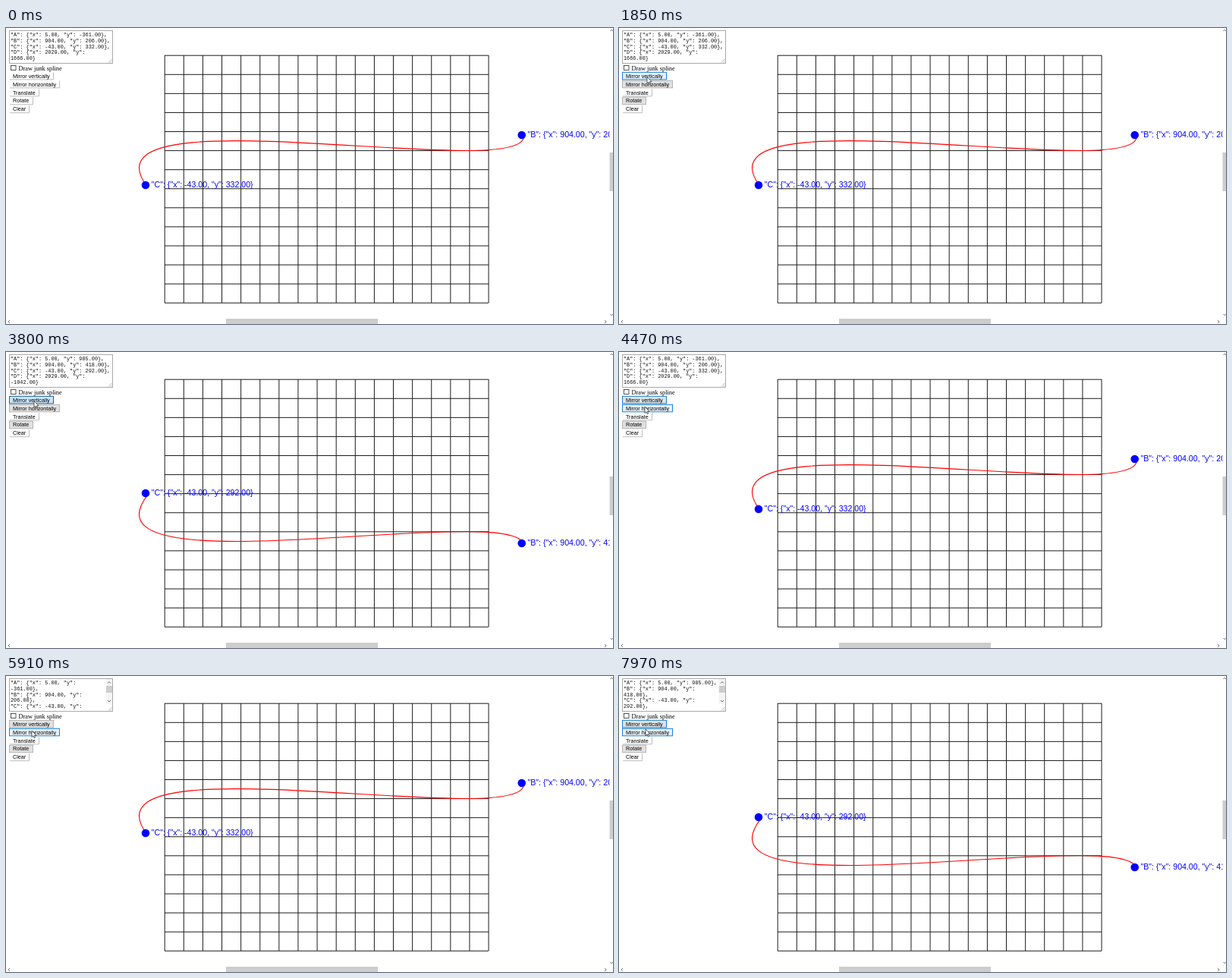
Recreate the animation shown at these times as an HTML page. Size 800x390 px, loop 8 s.

```html
<!DOCTYPE html>
<html lang="en">
<head>
<meta charset="utf-8">
<title>Spline editor</title>
<style>
  html, body { margin: 0; width: 100%; height: 100%; overflow: hidden; background: #fff; }
  svg { display: block; width: 800px; height: 390px; }
  text { white-space: pre; }
  .label { font: 10.6px "Liberation Sans", Arial, sans-serif; fill: #00f; }
  .btn text { font: 7.2px "Liberation Sans", Arial, sans-serif; fill: #000; }
  .area { font: 6.85px "Liberation Mono", "Courier New", monospace; fill: #111; }
  .check { font: 8.3px "Liberation Serif", "Times New Roman", serif; }
  .arrow { fill: none; stroke: #555; stroke-width: .9; }
  .thumb { fill: #cdcdcd; }
</style>
</head>
<body>
<svg viewBox="0 0 800 390">
  <path id="grid" fill="none" stroke="#1c1c1c" stroke-width="1"/>
  <path id="curve" fill="none" stroke="#f00" stroke-width="1.1"/>
  <g id="points"></g>

  <rect x="795.5" width="5" height="390" fill="#fff"/>
  <rect class="thumb" x="795.5" y="164" width="4.5" height="51"/>
  <rect class="thumb" x="290" y="383" width="200" height="7"/>
  <path class="arrow" d="M796.5 4l1.7-1.7 1.7 1.7M796.5 377l1.7 1.7 1.7-1.7M5 385l-1.9 1.9 1.9 1.9M789.2 385l1.9 1.9-1.9 1.9"/>

  <rect x="4.5" y="3.5" width="136" height="43" fill="#fff" stroke="#a9a9a9"/>
  <g id="area" class="area"></g>
  <g id="bar">
    <rect x="131.5" y="4" width="8.5" height="33" fill="#f4f4f4"/>
    <rect class="thumb" x="132" y="13" width="8" height="9"/>
    <path class="arrow" d="M134 9.6l2-2 2 2M134 32l2 2 2-2"/>
  </g>
  <path d="M135 45.5l4.5-4.5M137.6 45.5l1.9-1.9" stroke="#999" stroke-width=".7"/>

  <rect x="6.5" y="49.5" width="6.5" height="6" fill="#fff" stroke="#444" stroke-width=".9"/>
  <text class="check" x="16.5" y="55.6">Draw junk spline</text>
  <g id="buttons"></g>
  <path id="cursor" d="M0 0V8.5L2 6.8 3.3 9.8 4.6 9.2 3.3 6.3H6Z" fill="#fff" stroke="#000" stroke-width=".6"/>
</svg>
<script>
const LOOP = 8000, SCALE = 0.5235, OX = 206.5, OY = 33.2, SHIFT = 2.5;
const $ = id => document.getElementById(id);

function add(parent, tag, attrs) {
  const el = document.createElementNS('http://www.w3.org/2000/svg', tag);
  for (const k in attrs) el.setAttribute(k, attrs[k]);
  return parent.appendChild(el);
}
function set(el, attrs) {
  for (const k in attrs) el.setAttribute(k, attrs[k]);
}

const base = { A: [5, -361], B: [904, 206], C: [-43, 332], D: [2029, 1666] };

// Pointer positions: time, x, y
const moves = [
  [190, 279, 372], [300, 170, 265], [420, 80, 160], [530, 27, 97],
  [640, 30, 86], [760, 34, 73], [870, 37, 64.5],
  [4250, 37, 67], [4360, 36, 70], [4470, 34, 72],
  [4900, 35, 69.5], [5010, 35.5, 65.5], [5130, 36, 65],
  [5450, 36, 67], [5560, 35, 71], [5680, 34, 72],
  [7310, 35, 69], [7420, 36, 65],
  [7750, 36, 67], [7860, 36, 69.5], [7970, 35, 70]
];
// Clicks: press time, release time, button index
const clicks = [
  [1190, 1300, 0], [1730, 1850, 0], [2180, 2280, 0], [2710, 2830, 0],
  [3260, 3370, 0], [3800, 3900, 0], [4570, 4680, 1], [5800, 5910, 1],
  [6120, 6230, 1], [6450, 6550, 1], [7530, 7640, 0]
];

const buttons = [
  ['Mirror vertically', 58], ['Mirror horizontally', 66], ['Translate', 39],
  ['Rotate', 31], ['Clear', 26]
].map(([name, w], i) => {
  const y = 58 + i * 10.95, g = add($('buttons'), 'g', { class: 'btn' });
  const box = add(g, 'rect', { x: 4.5, y: y + .3, width: w, height: 9.6, 'stroke-width': .9 });
  const edge = add(g, 'path', {
    d: `M5 ${y + 9.9}H${w + 4.5}V${y + .5}`, fill: 'none', stroke: '#adadad', 'stroke-width': .8
  });
  add(g, 'text', { x: 9, y: y + 7.6 }).textContent = name;
  return { w, y, box, edge };
});

const dots = ['B', 'C'].map(name => ({
  name,
  dot: add($('points'), 'circle', { r: 5.3, fill: '#00f' }),
  label: add($('points'), 'text', { class: 'label' })
}));

const lines = [0, 1, 2, 3, 4].map(i => add($('area'), 'text', { x: 6, y: 11 + i * 7.8 }));

let grid = '';
for (let i = 0; i <= 17; i++) grid += `M${209.2 + i * 25.11} 36V362`;
for (let i = 0; i <= 13; i++) grid += `M209 ${36.2 + i * 25.08}H636`;
$('grid').setAttribute('d', grid);

const entry = (name, [x, y]) => `"${name}": {"x": ${x.toFixed(2)}, "y": ${y.toFixed(2)}}`;

function wrap(text, cols) {
  const out = [];
  let line = '';
  for (const word of text.split(' ')) {
    const next = line ? line + ' ' + word : word;
    if (next.length > cols && line) { out.push(line); line = word; }
    else line = next;
  }
  return out.concat(line);
}

// Catmull-Rom segment from B to C
function spline({ A, B, C, D }) {
  const at = (x, y) => `${(x * SCALE + OX + SHIFT).toFixed(2)} ${(y * SCALE + OY + SHIFT).toFixed(2)}`;
  return `M${at(...B)}C${at(B[0] + (C[0] - A[0]) / 6, B[1] + (C[1] - A[1]) / 6)} ` +
    `${at(C[0] - (D[0] - B[0]) / 6, C[1] - (D[1] - B[1]) / 6)} ${at(...C)}`;
}

const over = (b, [, x, y]) => x >= 4 && x <= b.w + 5 && y >= b.y && y < b.y + 10.9;

function drawButtons(t, past) {
  const here = past[past.length - 1];
  const focus = clicks.filter(c => c[0] <= t).pop();
  buttons.forEach((b, i) => {
    const hover = here && over(b, here);
    const touched = (i < 2 || i === 3) && past.some(m => over(b, m));
    const active = focus && focus[2] === i;
    const pressed = active && t < focus[1];
    const fill = pressed ? '#cce4f7' : hover ? '#e5f1fb' : touched ? '#e1e1e1' : '#fff';
    const stroke = pressed ? '#005499' : hover || active ? '#0078d7' : touched ? '#adadad' : 'none';
    set(b.box, { fill, stroke });
    set(b.edge, { visibility: stroke === 'none' ? 'visible' : 'hidden' });
  });
}

function drawModel(t) {
  const done = clicks.filter(c => c[1] <= t);
  const odd = i => done.filter(c => c[2] === i).length % 2;
  const pts = {};
  for (const k in base) {
    const [x, y] = base[k];
    pts[k] = [odd(1) ? 816 - x : x, odd(0) ? 624 - y : y];
  }
  $('curve').setAttribute('d', spline(pts));
  for (const { name, dot, label } of dots) {
    const cx = pts[name][0] * SCALE + OX, cy = pts[name][1] * SCALE + OY;
    set(dot, { cx, cy });
    set(label, { x: cx + 7.8, y: cy + 2.8 });
    label.textContent = entry(name, pts[name]);
  }
  const scrolls = done.some(c => c[2] === 1);
  $('bar').setAttribute('visibility', scrolls ? 'visible' : 'hidden');
  const rows = Object.keys(pts).flatMap(k =>
    wrap(entry(k, pts[k]) + (k === 'D' ? '' : ','), scrolls ? 30 : 32));
  lines.forEach((el, i) => { el.textContent = rows[i] || ''; });
}

function draw(t) {
  const past = moves.filter(m => m[0] <= t);
  const here = past[past.length - 1];
  drawModel(t);
  drawButtons(t, past);
  set($('cursor'), here
    ? { visibility: 'visible', transform: `translate(${here[1]} ${here[2]})` }
    : { visibility: 'hidden' });
}

const start = performance.now();
function tick() {
  draw((performance.now() - start) % LOOP);
  requestAnimationFrame(tick);
}
tick();
</script>
</body>
</html>
```
